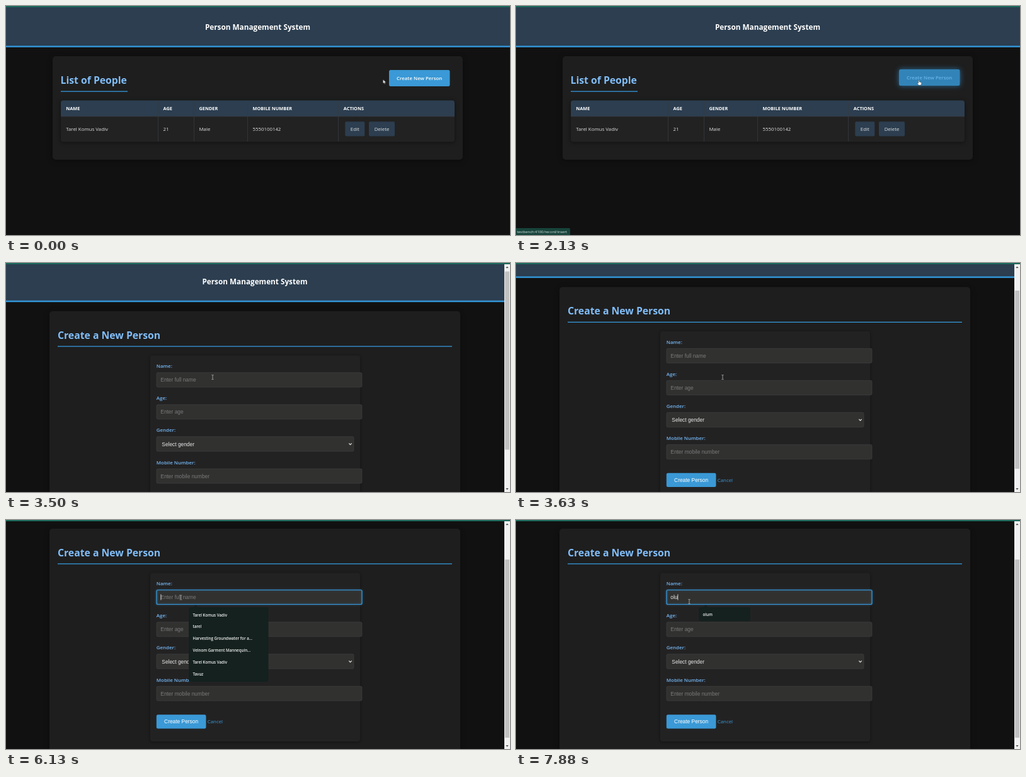
Animation, 800 px wide and 365 px high, one loop 8 s. Source, as an HTML page:

```html
<!DOCTYPE html>
<html lang="en">
<head>
<meta charset="utf-8">
<title>Person Management System</title>
<style>
html, body { margin: 0; width: 100%; height: 100%; overflow: hidden; background: #111; }
svg { display: block; width: 100%; height: 100%; }
text { font: 7.85px "Open Sans", "Noto Sans", sans-serif; fill: #e0e0e0; white-space: pre; }
.mid { text-anchor: middle; }
.title { font-size: 11.75px; font-weight: 700; fill: #fff; }
.head { font-size: 15.75px; font-weight: 700; fill: #80bdf8; }
.th { font-size: 7.35px; font-weight: 700; fill: #fff; }
.label { font-size: 7.9px; font-weight: 600; fill: #74b9f5; }
.field { font: 8.4px "Liberation Sans", Arial, sans-serif; fill: #e8e8e8; }
.hint { fill: #7a7a7a; }
.item { font-size: 6.2px; font-weight: 600; fill: #f2f2f2; }
.small { font-size: 5.85px; fill: #d8e4e1; }
.bar { fill: #2c3e50; }
.line { fill: #3498db; }
.card { fill: #1e1e1e; filter: drop-shadow(0 2px 4px rgba(0,0,0,.35)); }
.btn { fill: #3a99d6; }
.input { fill: #313130; stroke: #414141; stroke-width: .7; }

/* one loop is 8 s, so 1% is 80 ms */
.anim, .anim * { animation: 8s step-end infinite; }
#list { animation-name: list; }
#form { animation-name: form; }
#page { animation-name: scroll; }
#thumb { animation-name: thumb; }
#status { animation-name: status; }
#hover { animation-name: lift; animation-timing-function: ease; }
#hoverFill { animation-name: hoverFill; animation-timing-function: ease; }
#hoverText { animation-name: hoverText; animation-timing-function: ease; }
#focus { animation-name: focus; }
#hintName { animation-name: hint; }
#menu { animation-name: menu; }
#match { animation-name: typed; }
#one { animation-name: one; }
#two { animation-name: two; }
#three { animation-name: three; }
#caret { animation-name: caret; }
#mouse { animation-name: mouse; animation-timing-function: linear; }
#arrow { animation-name: arrow; }
#hand { animation-name: hand; }
#beam { animation-name: beam; }

@keyframes list { 0% { opacity: 1 } 29.75%, 100% { opacity: 0 } }
@keyframes form { 0% { opacity: 0 } 29.75%, 100% { opacity: 1 } }
@keyframes status { 0% { opacity: 0 } 14% { opacity: 1 } 33%, 100% { opacity: 0 } }
@keyframes lift {
  0%, 12.5% { transform: none }
  16.5%, 100% { transform: translateY(-1px) }
}
@keyframes hoverFill {
  0%, 12.5% { fill: #3a99d6; filter: drop-shadow(0 0 0 rgba(52,152,219,0)) }
  16.5%, 100% { fill: #3284b8; filter: drop-shadow(0 0 4px rgba(52,152,219,.65)) }
}
@keyframes hoverText {
  0%, 12.5% { fill: #fff }
  16.5%, 100% { fill: #68b3e8 }
}
@keyframes scroll {
  0% { transform: none }
  43.75% { transform: translateY(-3.5px) }
  45.31% { transform: translateY(-42px) }
  46.88%, 100% { transform: translateY(-66.5px) }
}
@keyframes thumb {
  0% { transform: none }
  43.75% { transform: translateY(2.5px) }
  45.31% { transform: translateY(33px) }
  46.88%, 100% { transform: translateY(52px) }
}
@keyframes focus { 0% { opacity: 0 } 62.5%, 100% { opacity: 1 } }
@keyframes hint { 0% { opacity: 1 } 81.25%, 100% { opacity: 0 } }
@keyframes menu { 0% { opacity: 0 } 65.63% { opacity: 1 } 81.25%, 100% { opacity: 0 } }
@keyframes typed { 0% { opacity: 0 } 81.25%, 100% { opacity: 1 } }
@keyframes one { 0% { opacity: 0 } 81.25%, 100% { opacity: 1 } }
@keyframes two { 0% { opacity: 0 } 84.38%, 100% { opacity: 1 } }
@keyframes three { 0% { opacity: 0 } 87.5%, 100% { opacity: 1 } }
@keyframes caret {
  0% { opacity: 0; transform: none }
  62.5% { opacity: 1; transform: none }
  68.75% { opacity: 0; transform: none }
  75% { opacity: 1; transform: none }
  81.25% { opacity: 1; transform: translateX(4.4px) }
  84.38% { opacity: 1; transform: translateX(6.3px) }
  87.5% { opacity: 1; transform: translateX(11px) }
  93.75% { opacity: 0; transform: translateX(11px) }
  98.5%, 100% { opacity: 1; transform: translateX(11px) }
}
@keyframes mouse {
  0%, 1.62% { transform: translate(598.5px, 117px); animation-timing-function: steps(6) }
  11% { transform: translate(606px, 118px) }
  12.5% { transform: translate(613px, 118px); animation-timing-function: steps(4) }
  18.75% { transform: translate(639.5px, 118px) }
  29.75% { transform: translate(639.5px, 118px); animation-timing-function: steps(6) }
  39.13% { transform: translate(328px, 182px) }
  45.31% { transform: translate(328px, 182px); animation-timing-function: steps(5) }
  53.13% { transform: translate(278px, 128px) }
  54.75% { transform: translate(278px, 128px); animation-timing-function: steps(3) }
  59.38% { transform: translate(277.5px, 123.5px) }
  81.25% { transform: translate(277.5px, 123.5px); animation-timing-function: steps(5) }
  89.13%, 100% { transform: translate(275px, 130px) }
}
@keyframes arrow {
  0% { opacity: 1 } 12.5% { opacity: 0 }
  29.75% { opacity: 1 } 39.13%, 100% { opacity: 0 }
}
@keyframes hand { 0% { opacity: 0 } 12.5% { opacity: 1 } 29.75%, 100% { opacity: 0 } }
@keyframes beam { 0% { opacity: 0 } 39.13%, 100% { opacity: 1 } }
</style>
</head>
<body>
<svg class="anim" viewBox="0 0 800 365" preserveAspectRatio="none">
  <rect width="800" height="365" fill="#111"/>

  <g id="list">
    <rect class="bar" y="2" width="800" height="61.5"/>
    <rect class="line" y="63.3" width="800" height="2.5"/>
    <text class="title mid" x="399.5" y="37.5">Person Management System</text>
    <rect class="card" x="74" y="80" width="651" height="165" rx="5"/>
    <text class="head" x="86.5" y="123.8">List of People</text>
    <rect class="line" x="87" y="135.5" width="106" height="1.3"/>

    <g id="hover">
      <rect id="hoverFill" class="btn" x="608" y="102" width="96.5" height="26" rx="2.5"/>
      <text id="hoverText" class="mid" x="656.2" y="118" style="font-weight:600">Create New Person</text>
    </g>

    <rect x="87" y="150.5" width="625" height="66" rx="4" fill="#222" style="filter:drop-shadow(0 1px 3px rgba(0,0,0,.5))"/>
    <path class="bar" d="M87 176V154.500q0-4 4-4H708q4 0 4 4V176z"/>
    <path d="M241.500 150.500V216M298.500 150.500V216M383.500 150.500V216M527.500 150.500V216M87 176H712" stroke="#353a3f" stroke-width=".8"/>
    <text class="th" x="95.300" y="165.800">NAME</text>
    <text class="th" x="249.500" y="165.800">AGE</text>
    <text class="th" x="306.500" y="165.800">GENDER</text>
    <text class="th" x="391.500" y="165.800">MOBILE NUMBER</text>
    <text class="th" x="535.800" y="165.800">ACTIONS</text>
    <text x="95.300" y="199.300">Tarel Komus Vadiv</text>
    <text x="249.500" y="199.300">21</text>
    <text x="306.500" y="199.300">Male</text>
    <text x="391.500" y="199.300">5550100142</text>
    <rect class="bar" x="538.300" y="184.300" width="31" height="23.200" rx="2"/>
    <rect class="bar" x="576" y="184.300" width="41" height="23.200" rx="2"/>
    <text class="mid" x="553.800" y="199.300" style="font-weight:500">Edit</text>
    <text class="mid" x="596.500" y="199.300" style="font-weight:500">Delete</text>
  </g>

  <g id="form">
    <rect width="800" height="365" fill="#111"/>
    <g id="page">
      <rect class="bar" y="2" width="791" height="61.5"/>
      <rect class="line" y="63.3" width="791" height="2.5"/>
      <text class="title mid" x="395" y="37.5">Person Management System</text>
      <rect class="card" x="69" y="80.300" width="652" height="364" rx="5"/>
      <text class="head" x="82" y="124">Create a New Person</text>
      <rect class="line" x="82" y="135.700" width="626" height="1.300"/>
      <rect x="229" y="150.700" width="333" height="268.800" rx="4" fill="#232223" style="filter:drop-shadow(0 1px 2px rgba(0,0,0,.4))"/>

      <text class="label" x="238.800" y="170.700">Name:</text>
      <rect class="input" x="239" y="178.300" width="326" height="23" rx="2"/>
      <text id="hintName" class="field hint" x="245.300" y="192.700">Enter full name</text>

      <text class="label" x="238.800" y="221.700">Age:</text>
      <rect class="input" x="239" y="229.300" width="326" height="23" rx="2"/>
      <text class="field hint" x="245.300" y="243.700">Enter age</text>

      <text class="label" x="238.800" y="272.700">Gender:</text>
      <rect class="input" x="239" y="280.300" width="313" height="23.300" rx="2"/>
      <text class="field" x="247.300" y="295">Select gender</text>
      <path d="M544.300 290.800l2.200 2.300 2.200-2.300" fill="none" stroke="#e8e8e8" stroke-width="1.200"/>

      <text class="label" x="238.800" y="324">Mobile Number:</text>
      <rect class="input" x="239" y="331.600" width="326" height="23" rx="2"/>
      <text class="field hint" x="245.300" y="346">Enter mobile number</text>

      <rect class="btn" x="238.800" y="376.700" width="78.700" height="22.300" rx="2.500"/>
      <text class="field mid" x="278.100" y="390.900" style="fill:#fff">Create Person</text>
      <text x="319.800" y="390.700" style="fill:#3a99d6">Cancel</text>
    </g>

    <rect x="791" y="2" width="9" height="363" fill="#f1f1f1"/>
    <rect id="thumb" x="792" y="11" width="7" height="284" fill="#c1c1c1"/>
    <path d="M793.300 8l2.200-2.600 2.200 2.600zM793.300 359l2.200 2.600 2.200-2.600z" fill="#505050"/>

    <g id="focus">
      <rect x="239" y="111.500" width="326" height="23" rx="2" fill="none" stroke="#3498db" stroke-width="1.200" style="filter:drop-shadow(0 0 1.500px rgba(52,152,219,.7))"/>
      <text id="one" class="field" x="245.300" y="125.800">o</text>
      <text id="two" class="field" x="249.970" y="125.800">l</text>
      <text id="three" class="field" x="251.840" y="125.800">u</text>
      <rect id="caret" x="245.500" y="118.300" width=".8" height="9.400" fill="#f0f0f0"/>
    </g>

    <g id="menu">
      <path d="M297 139.500l4-4 4 4z" fill="#14211e"/>
      <rect x="290" y="139" width="126.500" height="119" rx="3" fill="#14211e"/>
      <text class="item" x="296.500" y="153.600">Tarel Komus Vadiv</text>
      <text class="item" x="296.500" y="172.400">tarel</text>
      <text class="item" x="296.500" y="191.200">Harvesting Groundwater for a...</text>
      <text class="item" x="296.500" y="210">Velnom Garment Mannequin...</text>
      <text class="item" x="296.500" y="228.800">Tarel Komus Vadiv</text>
      <text class="item" x="296.500" y="247.600">Tavuz</text>
    </g>
    <g id="match">
      <path d="M297 139.500l4-4 4 4z" fill="#14211e"/>
      <rect x="290" y="139" width="82" height="22.300" rx="3" fill="#14211e"/>
      <text class="item" x="296.500" y="152.900">olum</text>
    </g>
  </g>

  <rect width="800" height="2" fill="#1b6a5c"/>

  <g id="status">
    <path d="M0 354H84q2 0 2 2V365H0z" fill="#17443b"/>
    <text class="small" x="1.500" y="361.600">testbench:4100/record/insert</text>
  </g>

  <g id="mouse">
    <path id="arrow" d="M0 0V6.600L1.500 5.300 2.500 7.500 3.600 7 2.600 4.900H4.600z" fill="#fff" stroke="#000" stroke-width=".4"/>
    <path id="hand" d="M-.8.6Q0-.4.8.6V3L3.600 3.700Q4.300 4 4.100 5L3.500 8.300H-.4L-2.500 5.300Q-2.300 4.300-.8 5z" fill="#fff" stroke="#000" stroke-width=".4"/>
    <path id="beam" d="M-1.600-3.500H-.5L0-3 .5-3.500H1.600M0-3V3M-1.600 3.500H-.5L0 3 .5 3.500H1.600" fill="none" stroke="#bbb" stroke-width=".8"/>
  </g>
</svg>
</body>
</html>
```
